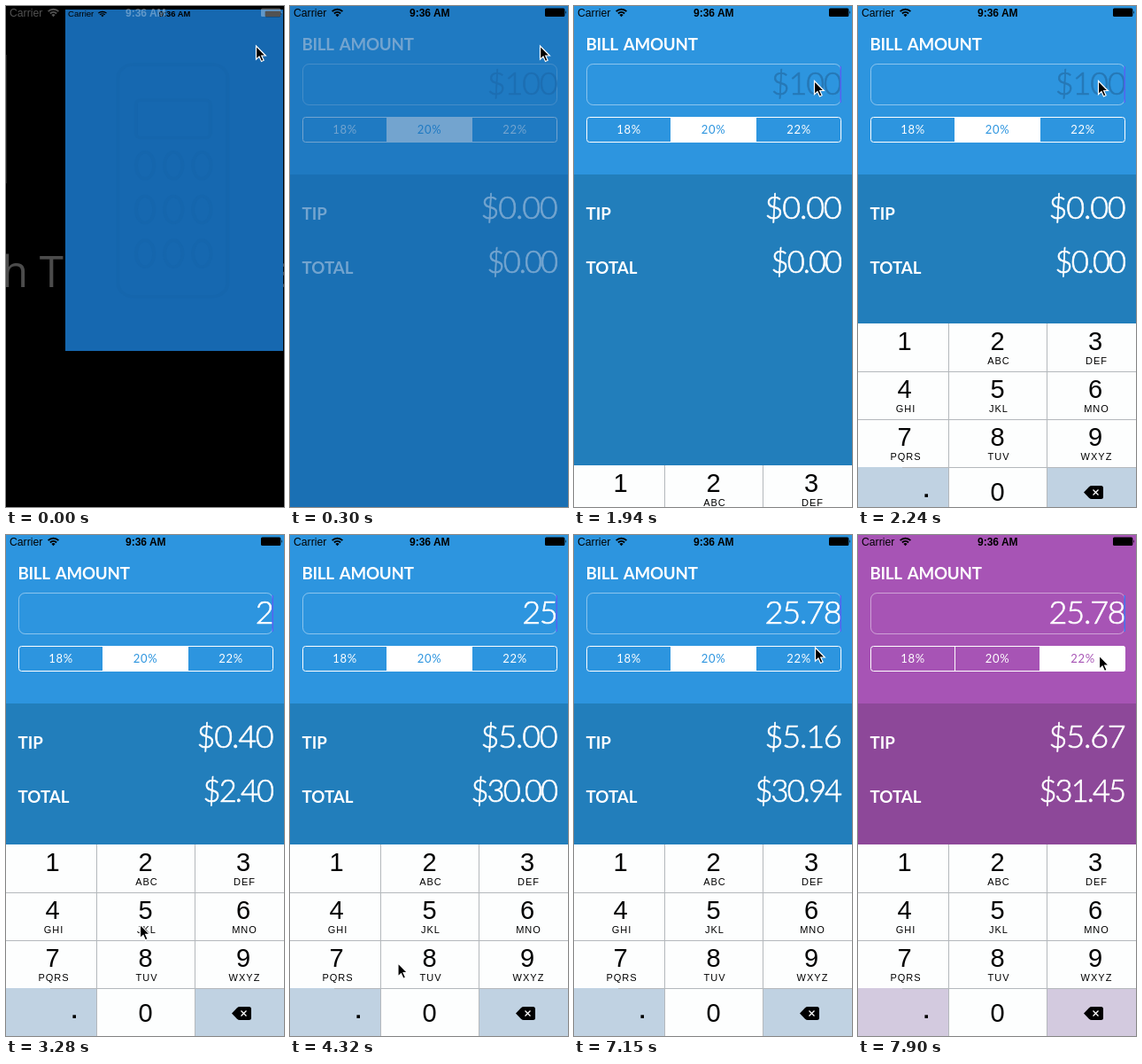
Animation of 314 by 565 pixels, one loop 8 s. Source, as an HTML page:

```html
<!DOCTYPE html>
<html lang="en">
<head>
<meta charset="utf-8">
<title>Tip calculator</title>
<style>
  html, body { margin: 0; width: 100%; height: 100%; overflow: hidden; background: #000; }
  svg { display: block; width: 314px; height: 565px; }
  text { white-space: pre; }
  .bar { font: 12.2px "Liberation Sans", Arial, sans-serif; }
  .clock { font-weight: 700; font-size: 12px; }
  .label { font: 700 18.7px Lato, sans-serif; fill: #fff; word-spacing: 3px; }
  #title { letter-spacing: -.25px; }
  .money {
    font: 300 36px Lato, sans-serif; letter-spacing: -1.2px; text-anchor: end;
    color: #fff; fill: currentColor; stroke: currentColor; stroke-width: .7px;
  }
  #total { font-size: 34.5px; letter-spacing: -1.9px; }
  .seg { font: 13px Lato, sans-serif; letter-spacing: .7px; text-anchor: middle; fill: #fff; }
  .digit { font: 29px "Liberation Sans", Arial, sans-serif; text-anchor: middle; }
  .sub { font: 11px "Liberation Sans", Arial, sans-serif; letter-spacing: 1px; text-anchor: middle; }
  .ghost { font: 400 49px "Open Sans", sans-serif; fill: #4c4c4c; }
</style>
</head>
<body>
<svg viewBox="0 0 314 565">
  <defs>
    <g id="status">
      <text class="bar" x="4" y="11.6">Carrier</text>
      <text class="bar clock" x="135" y="11.6">9:36 AM</text>
      <path fill="none" stroke="currentColor" stroke-width="1.9"
        d="M47.6 6.1a8.4 8.4 0 0 1 11.8 0M49.9 8.5a5.1 5.1 0 0 1 7.2 0"/>
      <path fill="currentColor" d="M53.5 12.2l-2.1-2.2a3 3 0 0 1 4.2 0z"/>
      <rect x="288" y="2.5" width="22.3" height="9.5" rx="1.5" fill="currentColor"/>
      <path fill="currentColor" d="M311 5.3q1.8 2 0 4z"/>
    </g>
  </defs>

  <rect width="314" height="565"/>
  <g id="home">
    <text class="ghost" x="-5" y="317">h T</text>
    <text class="ghost" x="305" y="317">s</text>
    <rect y="55" width="1" height="145" fill="#222"/>
  </g>

  <g id="splash">
    <rect width="314" height="565" fill="#1668b0"/>
    <g id="calc" fill="none" stroke="#1566ad" stroke-width="5">
      <rect x="76" y="91" width="158" height="384" rx="22"/>
      <rect x="102" y="150" width="107" height="62" rx="6"/>
    </g>
    <use href="#status"/>
  </g>

  <g id="app">
    <rect id="top" width="314" height="190"/>
    <rect id="bottom" y="190" width="314" height="375"/>
    <use href="#status"/>
    <text id="title" class="label" x="13.5" y="50">BILL AMOUNT</text>
    <rect x="14.5" y="65.5" width="287" height="46" rx="7" fill="none" stroke="#fff" stroke-opacity=".45"/>
    <text id="bill" class="money" x="301.5" y="100.3"></text>
    <rect id="caret" x="300.5" y="68" width="1.5" height="41"/>

    <path id="pick" fill="#fff"/>
    <rect x="14.5" y="125.5" width="287" height="28" rx="3" fill="none" stroke="#fff"/>
    <path d="M109.5 126v27M205.5 126v27" stroke="#fff"/>
    <g id="segs">
      <text class="seg" x="62" y="144">18%</text>
      <text class="seg" x="157.5" y="144">20%</text>
      <text class="seg" x="254" y="144">22%</text>
    </g>

    <text class="label" x="13.5" y="241">TIP</text>
    <text class="label" x="13.5" y="302">TOTAL</text>
    <text id="tip" class="money" x="301.5" y="240.3"></text>
    <text id="total" class="money" x="301.2" y="300.8"></text>

    <g id="pad">
      <g id="keys"></g>
      <path d="M0 54.5h314M0 108.5h314M50 162.5h264M102.5 0v216M213.5 0v216" stroke="#b4b8bc"/>
      <g id="glyphs"></g>
      <rect x="75.4" y="192.3" width="3.6" height="3.6"/>
      <path d="M255 190.5l6-6.3q1.3-1.2 3-1.2h10.5q2.5 0 2.5 2.5v10q0 2.5-2.5 2.5H264q-1.7 0-3-1.2z"/>
      <path d="M265.5 187.5l6 6m0-6l-6 6" stroke="#fff" stroke-width="1.3"/>
    </g>
  </g>

  <use id="fade" href="#status" fill="#fff" color="#fff"/>
  <path id="cursor" d="M0 0V15.2L3.5 12L6 17.5L8.6 16.3L6.2 11H10.8Z" stroke="#fff" stroke-width="1.2"/>
</svg>

<script>
const LOOP = 8000;
const $ = id => document.getElementById(id);
const set = (el, attrs) => { for (const k in attrs) el.setAttribute(k, attrs[k]); };
const add = (parent, tag, attrs, text = '') => {
  const el = document.createElementNS('http://www.w3.org/2000/svg', tag);
  set(el, attrs);
  el.textContent = text;
  return parent.appendChild(el);
};

// Calculator buttons on the launch screen
for (let i = 0; i < 9; i++)
  add($('calc'), 'ellipse', { cx: 115 + i % 3 * 41, cy: 258 + Math.floor(i / 3) * 73, rx: 13, ry: 22 });

// Keypad
const colX = [0, 103, 214, 314], midX = [52.5, 157.5, 268];
const letters = ['', 'ABC', 'DEF', 'GHI', 'JKL', 'MNO', 'PQRS', 'TUV', 'WXYZ'];
const keys = [...'123456789.0<'].map((name, i) => {
  const c = i % 3, y = Math.floor(i / 3) * 54;
  const rect = add($('keys'), 'rect', { x: colX[c], y, width: colX[c + 1] - colX[c], height: 54 });
  if (i < 9) {
    add($('glyphs'), 'text', { class: 'digit', x: midX[c], y: y + 30 }, name);
    add($('glyphs'), 'text', { class: 'sub', x: midX[c] + 1.5, y: y + 45.5 }, letters[i]);
  }
  return { name, rect, grey: name === '.' || name === '<' };
});
add($('glyphs'), 'text', { class: 'digit', x: midX[1], y: 199.5 }, '0');

// Bursts of activity: start, end, number of steps
const bursts = [[150, 600, 4], [1200, 1500, 3], [1940, 2840, 7], [2990, 3870, 7],
  [4170, 5210, 8], [5360, 5810, 4], [6400, 7150, 6], [7450, 7900, 4]];

// Time of the latest visible step
function snap(t) {
  let s = 0;
  for (const [from, to, n] of bursts) {
    if (t < from) break;
    const step = (to - from) / (n - 1);
    s = from + Math.min(n - 1, Math.floor((t - from + 5) / step)) * step;
  }
  return s;
}

// Piecewise linear track of [time, ...values]
function track(t, pts) {
  const i = pts.findIndex(p => p[0] > t);
  if (i === 0) return pts[0].slice(1);
  if (i < 0) return pts[pts.length - 1].slice(1);
  const a = pts[i - 1], b = pts[i], k = (t - a[0]) / (b[0] - a[0]);
  return a.slice(1).map((v, j) => v + (b[j + 1] - v) * k);
}
const latest = (t, list) => list.filter(e => e[0] <= t + 8).pop()[1];
const mix = (a, b, k) => `rgb(${a.map((v, i) => Math.round(v + (b[i] - v) * k))})`;

const launch = [[0, 67, 4, 246, 385], [150, 14, 1, 299, 526], [300, 0, 0, 314, 565]];
const reveal = [[150, 0], [300, .4], [450, .77], [600, 1]];
const rise = [[1800, 565], [1940, 518], [2090, 401], [2240, 358], [2390, 349]];
const pointer = [[1050, 282.5, 45], [1500, 271.5, 84.5], [2240, 271.5, 84.5], [2690, 150, 385],
  [3130, 150, 385], [3285, 151.5, 440], [3430, 150, 451], [4170, 150, 451], [4615, 66, 546],
  [4770, 66, 546], [5060, 62.5, 502], [5360, 62.5, 502], [5660, 149, 502.5], [6250, 149, 502.5],
  [7000, 272.5, 127], [7300, 272.5, 127], [7600, 272.5, 136]];
const typed = [[0, ''], [3130, '2'], [3720, '25'], [4760, '25.'], [5360, '25.7'], [5810, '25.78']];
const presses = [[0, ''], [2990, '2'], [3130, ''], [3575, '5'], [3720, ''], [4615, '.'],
  [4760, ''], [5210, '7'], [5360, ''], [5660, '8'], [5810, '']];

function draw(time) {
  const t = snap(time);

  const [x, y, w, h] = track(t, launch);
  set($('splash'), { transform: `translate(${x} ${y}) scale(${w / 314} ${h / 565})` });
  set($('home'), { opacity: t < 150 ? 1 : .4 });
  set($('calc'), { opacity: track(t, [[0, 1], [300, 0]])[0] });
  set($('fade'), { opacity: track(t, [[0, .32], [300, 0]])[0] });
  set($('app'), { opacity: track(t, reveal)[0] });

  const tint = track(t, [[7450, 0], [7900, 1]])[0];
  const top = mix([45, 149, 223], [167, 84, 181], tint);
  const grey = mix([192, 210, 226], [211, 202, 223], tint);
  set($('top'), { fill: top });
  set($('bottom'), { fill: mix([34, 126, 187], [141, 72, 153], tint) });

  const bill = latest(t, typed), late = t >= 7595;
  const tip = Math.round(bill * (late ? 22 : 20)) / 100;
  $('bill').textContent = bill || '$100';
  $('bill').style.color = bill ? '#fff' : '#2678b6';
  $('tip').textContent = '$' + tip.toFixed(2);
  $('total').textContent = '$' + (+bill + tip).toFixed(2);
  set($('caret'), { fill: late ? '#3f74f2' : '#5562f2', opacity: t < 1940 ? 0 : 1 });

  set($('pick'), { d: late ? 'M205 125H299q3 0 3 3v23q0 3-3 3H205z' : 'M109 125h97v29h-97z' });
  [...$('segs').children].forEach((s, i) => s.style.fill = i === (late ? 2 : 1) ? top : '#fff');

  set($('pad'), { transform: `translate(0 ${track(t, rise)[0]})` });
  const down = latest(t, presses);
  for (const k of keys) set(k.rect, { fill: k.grey !== (k.name === down) ? grey : '#fdfefe' });

  set($('cursor'), { transform: `translate(${track(t, pointer)})` });
}

const start = performance.now();
function tick() {
  draw((performance.now() - start) % LOOP);
  requestAnimationFrame(tick);
}
tick();
</script>
</body>
</html>
```
